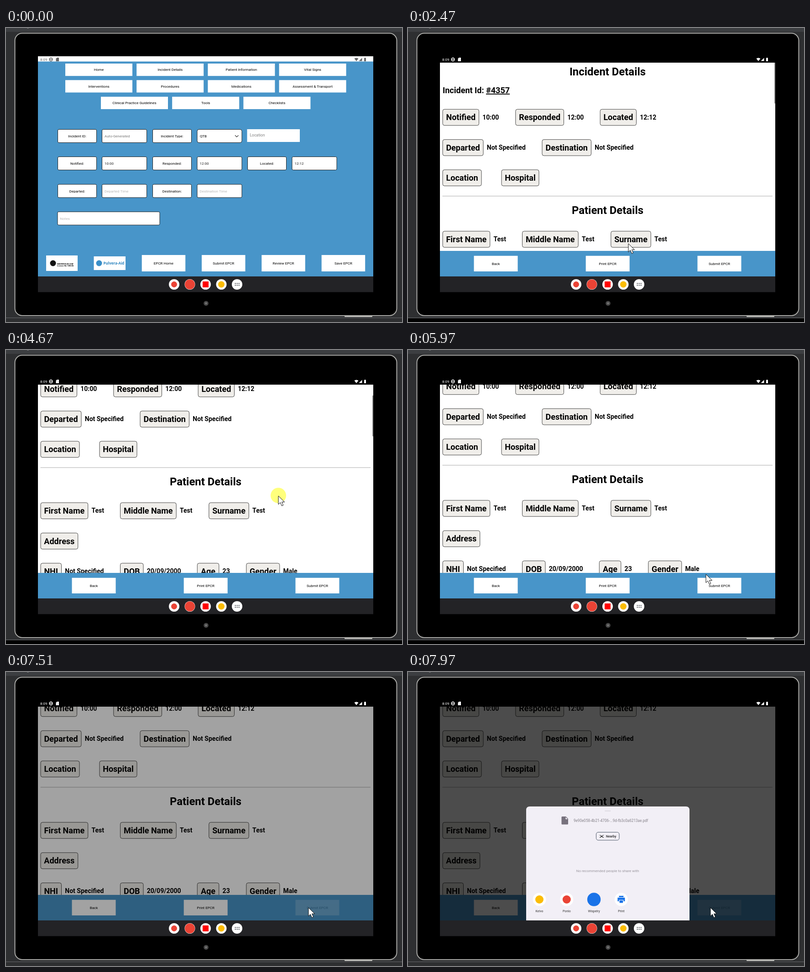
These frames come from a looping animation (868x645 px, 8000 ms). An HTML page:

```html
<!DOCTYPE html>
<html lang="en">
<head>
<meta charset="utf-8">
<title>Tablet form review</title>
<style>
  html, body { margin: 0; width: 100%; height: 100%; overflow: hidden; background: #2e2f31; }
  svg { display: block; width: 868px; height: 645px; font: 8px Roboto, sans-serif; }
  .mid { text-anchor: middle; }
  .bold { font-weight: 700; }
</style>
</head>
<body>
<svg id="stage" viewBox="0 0 868 645"></svg>
<script>
const LOOP = 8000;
const BLUE = '#4895c9';

// ---------- drawing helpers ----------
const rect = (x, y, w, h, fill, extra = '') =>
  `<rect x="${x}" y="${y}" width="${w}" height="${h}" fill="${fill}" ${extra}/>`;
const circle = (x, y, r, fill, extra = '') =>
  `<circle cx="${x}" cy="${y}" r="${r}" fill="${fill}" ${extra}/>`;
const path = (d, fill, extra = '') => `<path d="${d}" fill="${fill}" ${extra}/>`;
const text = (x, y, str, size = 8, fill = '#000', cls = '', extra = '') =>
  `<text x="${x}" y="${y}" font-size="${size}" fill="${fill}" class="${cls}" ${extra}>${str.replace('&', '&amp;')}</text>`;
const group = (id, body, extra = '') => `<g id="${id}" ${extra}>${body}</g>`;

const button = (x, y, w, h, label) =>
  rect(x, y, w, h, '#fff') + text(x + w / 2, y + h / 2 + 2.8, label, 8, '#000', 'mid');
const framed = (x, y, w, r = 2.5) =>
  rect(x + .5, y + .5, w - 1, 29, '#fff', `rx="${r}" stroke="#222"`);
const label = (x, y, str) =>
  framed(x, y, 86) + text(x + 43, y + 18, str, 8, '#000', 'mid');
const input = (x, y, str, fill = '#222', w = 99) =>
  framed(x, y, w) + text(x + 6, y + 18, str, 8, fill);

function statusBar(bg, fg, height) {
  return rect(70, 62, 735, height, bg) +
    text(75, 72, '8:09', 8, fg) +
    circle(98.5, 69, 3.4, 'none', `stroke="${fg}" stroke-width="1.5"`) +
    rect(96, 68.3, 5, 1.4, fg) +
    path('M109.5 67.5l2-2.5h4.5v8h-6.5z', fg) +
    path('M763.5 67q4.5-3 9 0l-4.5 5.8z', fg) +
    path('M780.5 65.5v7h-7z', fg) +
    rect(785, 66, 4, 7, fg, 'rx=".6"') + rect(786, 65, 2, 1.5, fg);
}

function device() {
  return rect(0, 0, 868, 645, '#2e2f31') +
    rect(0, 0, 868, 8.5, '#3c3e41') +
    circle(48, -2, 3, '#888') +
    rect(0, 635, 868, 1.5, '#55575a') +
    rect(742, 630, 61, 4, '#c4c4c0', 'rx="1.5"') +
    rect(19.5, 11.5, 837, 619.5, '#000', 'rx="16" stroke="#aaaaa7" stroke-width="2"') +
    circle(438.5, 604, 5.3, '#484848') + circle(438.5, 604, 2.2, '#777') +
    rect(0, 637, 868, 8, '#000', 'id="strip"');
}

function formPage() {
  const menu = [
    [130, 78, ['Home', 'Incident Details', 'Patient Information', 'Vital Signs']],
    [130, 114.3, ['Interventions', 'Procedures', 'Medications', 'Assessment & Transport']],
    [208, 150.8, ['Clinical Practice Guidelines', 'Tools', 'Checklists']],
  ].map(([x, y, names]) =>
    names.map((name, i) => button(x + i * 156.2, y, 147, 27.2, name)).join('')).join('');
  const faint = '#b8b8b8';
  return rect(70, 62, 735, 483, BLUE) + statusBar('#fff', '#666', 11.5) + menu +
    label(113, 222, 'Incident ID:') + input(210, 222, 'Auto-Generated', '#777') +
    label(321, 222, 'Incident Type:') + framed(418.5, 222, 99, 4) + text(425, 240, 'QTB') +
    path('M502 235.3l3.8 3.6 3.8-3.6', 'none', 'stroke="#222" stroke-width="1.1"') +
    rect(528.5, 222, 115.5, 28, '#fff') + text(534.5, 238, 'Location', 8.5, '#808080') +
    label(113, 282, 'Notified:') + input(210, 282, '10:00') +
    label(321, 282, 'Responded:') + input(418.5, 282, '12:00') +
    label(529, 282, 'Located:') + input(626.5, 282, '12:12') +
    label(113, 342.5, 'Departed:') + input(210, 342.5, 'Departed Time', faint) +
    label(321, 342.5, 'Destination:') + input(418.5, 342.5, 'Destination Time', faint) +
    input(112.5, 402.7, 'Notes', faint, 225) +
    rect(88, 499, 69, 34, '#fff') + circle(103, 516, 6.5, '#111') +
    text(112, 518.5, 'WAVERHOLM.COM', 4.2, '#000', 'bold', 'font-style="italic"') +
    text(112, 523, 'Licence No 100236', 4.2, '#000', 'bold') +
    rect(192.5, 501, 69.5, 30, '#fff') + circle(204, 516, 6.5, '#3a8fc8') +
    text(213.5, 519, 'Pulvera-Aid', 8, '#2f86c0', 'bold', 'font-family="Open Sans, sans-serif"') +
    button(297.7, 498, 95.5, 36, 'EPCR Home') +
    button(429, 498, 95.5, 36, 'Submit EPCR') +
    group('review', button(560.3, 498, 95.5, 36, 'Review EPCR')) +
    button(691.7, 498, 95.5, 36, 'Save EPCR');
}

// One report entry: tag position, tag width, caption and an optional value
const entry = (x, cy, w, caption, value = '') =>
  rect(x + .5, cy - 17.7, w - 1, 35.4, '#f0eeea', 'rx="4" stroke="#333" stroke-width=".9"') +
  text(x + w / 2, cy + 6.4, caption, 18, '#000', 'mid bold') +
  text(x + w + 7.3, cy + 4.6, value, 14, '#000', 'bold');

function reviewPage() {
  const report =
    text(437.5, 104, 'Incident Details', 23.9, '#000', 'mid bold') +
    text(76, 143, 'Incident Id: <tspan text-decoration="underline">#4357</tspan>', 18, '#000', 'bold') +
    entry(75.5, 196, 80.5, 'Notified', '10:00') +
    entry(235.3, 196, 106.7, 'Responded', '12:00') +
    entry(420.7, 196, 80.3, 'Located', '12:12') +
    entry(75.5, 262.4, 90, 'Departed', 'Not Specified') +
    entry(293.5, 262.4, 108.5, 'Destination', 'Not Specified') +
    entry(75.5, 328.7, 86, 'Location') + entry(204.5, 328.7, 83, 'Hospital') +
    rect(75.5, 368.3, 723.5, 1, '#aaa') +
    text(437.5, 408, 'Patient Details', 23.9, '#000', 'mid bold') +
    entry(75.5, 463.5, 104.7, 'First Name', 'Test') +
    entry(250, 463.5, 123.7, 'Middle Name', 'Test') +
    entry(444.3, 463.5, 88.5, 'Surname', 'Test') +
    entry(75.5, 530, 82.7, 'Address') +
    entry(75.5, 596.3, 46.5, 'NHI', 'Not Specified') +
    entry(250, 596.3, 51.5, 'DOB', '20/09/2000') +
    entry(418.8, 596.3, 48.5, 'Age', '23') +
    entry(526.3, 596.3, 74, 'Gender', 'Male');
  return statusBar('#000', '#fff', 14) + rect(70, 76, 735, 413, '#fff') +
    `<g clip-path="url(#viewport)">${group('report', report)}</g>` +
    rect(803, 76, 2, 89.5, '#8e8e8e', 'id="scrollbar"') +
    rect(70, 489, 735, 56, BLUE) +
    button(144.5, 499.8, 96, 34.2, 'Back') +
    button(389.7, 499.8, 96, 34.2, 'Print EPCR') +
    group('submit', button(634.5, 499.8, 96, 34.2, 'Submit EPCR'));
}

function shareSheet() {
  const apps = [['Kelvo', '#fbbc04'], ['Ponlo', '#ea4335'], ['Wispelry', '#1a73e8'], ['Print', null]];
  const icons = apps.map(([name, color], i) => {
    const x = 288 + i * 59.8;
    const printer = path(`M${x - 5} 491h10v3h-10zM${x - 8} 495h16v8h-3v-3h-10v3h-3z`, '#1a73e8') +
      rect(x - 3.8, 501, 7.6, 5.5, '#1a73e8');
    return circle(x, 499, 14.5, '#fff') +
      (color ? circle(x, 499, i === 2 ? 14.7 : 9, color) : printer) +
      text(x, 526.7, name, 6.9, '#333', 'mid');
  }).join('');
  return path('M259 545V303q0-8 8-8H609q8 0 8 8V545z', '#f2eff6') +
    rect(431, 304, 13.5, 1.6, '#d8d5dc', 'rx=".8"') +
    path('M338 317h8l5 5v11q0 1.500-1.500 1.500h-11.500q-1.500 0-1.500-1.500v-14.500q0-1.500 1.500-1.500z', '#77717d') +
    path('M345.500 318.500v4.500h4.500z', '#f2eff6') +
    text(363, 328.8, '9e90e058-4b21-4706-...9d-fb3c0a6213ae.pdf', 8.15, '#858189') +
    rect(412.500, 351.500, 50.500, 17.500, 'none', 'rx="4.500" stroke="#4c5868"') +
    path('M420 358q2 0 4.500 2.500t4.500 2.500M420 363q2 0 4.500-2.500t4.500-2.500', 'none', 'stroke="#222" stroke-width="1.200"') +
    text(434, 363, 'Nearby', 7, '#222', '', 'font-weight="500"') +
    text(437.5, 439, 'No recommended people to share with', 8, '#98949c', 'mid') + icons;
}

function navBar() {
  const y = 562.5;
  const dots = [0, 1, 2, 3, 4, 5].map(i =>
    circle(502.700 + i % 3 * 4, y - 2 + Math.floor(i / 3) * 4, 1.2, '#5f6368')).join('');
  return rect(70, 545, 735, 34.5, '#232326') +
    [368.5, 403, 437.5, 472, 506.5].map(x => circle(x, y, 11.5, '#fff')).join('') +
    circle(368.5, y, 6.5, '#ea4335') + circle(403, y, 11, '#ea4335') +
    rect(431, y - 6.500, 13, 13, '#f00') + circle(472, y, 7, '#fbbc04') + dots;
}

const stage = document.getElementById('stage');
stage.innerHTML =
  '<defs><clipPath id="viewport"><rect x="70" y="76" width="735" height="413"/></clipPath>' +
  '<clipPath id="app"><rect x="70" y="62" width="735" height="483"/></clipPath></defs>' +
  device() + formPage() + group('reviewPage', reviewPage()) +
  rect(70, 76, 735, 469, '#000', 'id="scrim"') +
  `<g clip-path="url(#app)">${group('sheet', shareSheet())}</g>` + navBar() +
  group('pointer', circle(0, -1, 17, '#ffff66', 'id="halo" opacity=".85"') +
    path('M0 0V18.500L4.300 14.500L7.500 21.800L10.700 20.400L7.600 13.400H13.500Z', '#fff', 'stroke="#111" stroke-width="1"'));

// ---------- motion ----------
const $ = Object.fromEntries([...stage.querySelectorAll('[id]')].map(el => [el.id, el]));
const ramp = (t, a, b) => Math.min(1, Math.max(0, (t - a) / (b - a)));
const ease = p => p * p * (3 - 2 * p);
const show = (el, opacity) => el.setAttribute('opacity', opacity);

// Pointer stops: time, x, y
const ROUTE = [
  [430, 574, 650], [1200, 585, 520], [1600, 585, 520], [2070, 510, 470],
  [2140, 496, 471], [2400, 496, 471], [2470, 483, 473], [3250, 540, 452],
  [3850, 597, 439], [4250, 597, 439], [4730, 597, 315], [4930, 597, 315],
  [5690, 642, 465], [5970, 653, 492], [6250, 663, 517], [LOOP, 663, 517],
];

function pointerAt(t) {
  const i = Math.max(1, ROUTE.findIndex(stop => stop[0] > t));
  const [t0, x0, y0] = ROUTE[i - 1], [t1, x1, y1] = ROUTE[i];
  const p = ease(ramp(t, t0, t1));
  return [x0 + (x1 - x0) * p, y0 + (y1 - y0) * p];
}

function render(t) {
  const [x, y] = pointerAt(t);
  $.pointer.setAttribute('transform', `translate(${x} ${y})`);
  show($.halo, t >= 4250 && t < 4730 ? .85 : 0);
  show($.strip, t >= 640 && t < 7040 ? 1 : 0);

  show($.review, 1 - .8 * ramp(t, 1320, 1460));
  show($.reviewPage, ramp(t, 1600, 1820));
  show($.submit, 1 - .8 * ramp(t, 6500, 6700));

  // The report follows the drag after a small touch threshold
  const scroll = t < 4250 ? 0 : t > 4730 ? 116 : Math.max(0, 439 - y - 8);
  $.report.setAttribute('transform', `translate(0 ${-scroll})`);
  $.scrollbar.setAttribute('y', 76 + scroll * .215);
  show($.scrollbar, t < 4250 ? 1 - ramp(t, 2470, 2720) : ramp(t, 4250, 4320) - ramp(t, 5100, 5350));

  show($.scrim, .7 * ramp(t, 7370, 7640));
  const rise = 1 - (1 - ramp(t, 7780, 7960)) ** 2;
  $.sheet.setAttribute('transform', `translate(0 ${250 * (1 - rise)})`);
}

const start = performance.now();
function tick() {
  render((performance.now() - start) % LOOP);
  requestAnimationFrame(tick);
}
tick();
</script>
</body>
</html>
```
